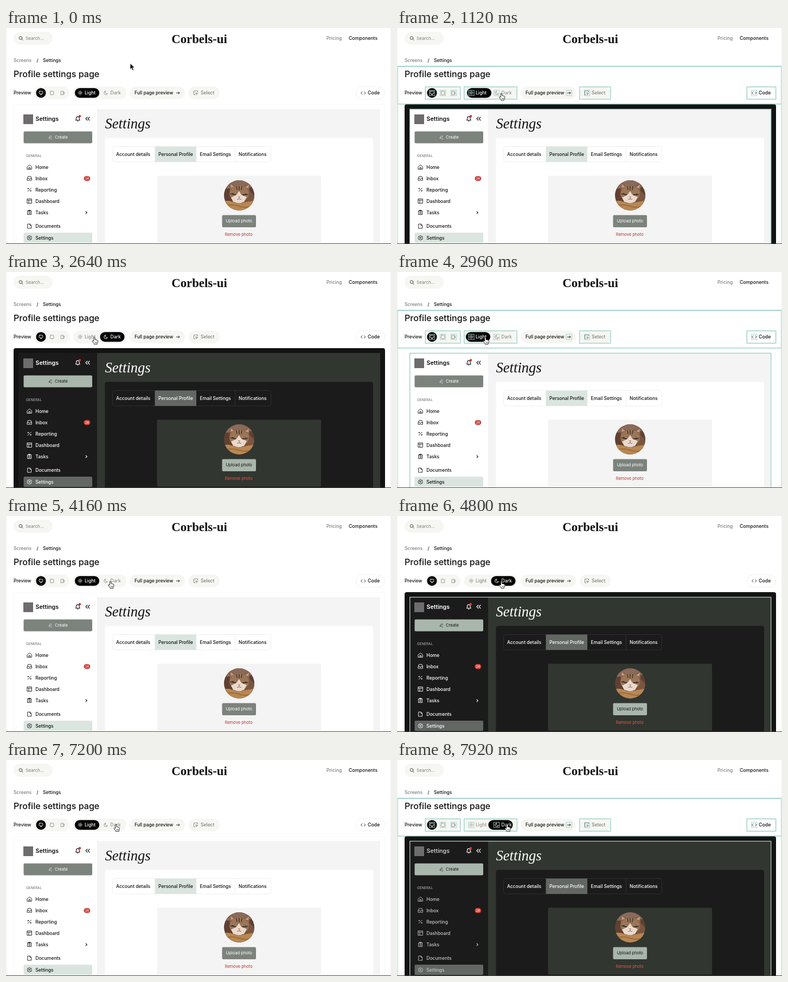
These frames come from a looping animation (710x400 px, 8000 ms). An HTML page:

```html
<!DOCTYPE html>
<html lang="en">
<head>
<meta charset="utf-8">
<title>Settings page theme toggle</title>
<style>
html, body { margin: 0; width: 100%; height: 100%; overflow: hidden; background: #fff; }
svg { display: block; width: 710px; height: 400px; font: 500 8.5px Inter, "Open Sans", sans-serif; }
text { fill: currentColor; white-space: pre; }
.mid { text-anchor: middle; }
.ic { fill: none; stroke: currentColor; stroke-width: .9; stroke-linecap: round; stroke-linejoin: round; }
.track { fill: #f6f6f2; }
.grey { color: #7d7d7b; }
#app {
  --side: #fff; --main: #f4f4f4; --panel: #fff; --line: #efefef; --sel: #dbe5df;
  --btn: #7c827c; --btnText: #fff; --text: #111; --soft: #666; --warn: #b23a2e; --badge: #c8423c;
  color: var(--text);
}
#app.dark {
  --side: #1b1b1b; --main: #313630; --panel: #1b1b1b; --line: #2c2e2c; --sel: #626764;
  --btn: #a9b6ac; --btnText: #161616; --text: #fff; --soft: #bbb; --warn: #f0543f; --badge: #e0473d;
}
</style>
</head>
<body>
<svg id="stage" viewBox="0 0 710 400" xmlns="http://www.w3.org/2000/svg">
  <defs>
    <clipPath id="round"><circle cx="430" cy="310" r="28"/></clipPath>
  </defs>
  <rect width="710" height="400" fill="#fff"/>

  <g id="page" color="#111">
    <rect class="track" x="14" y="7" width="72" height="24" rx="12"/>
    <g class="ic" color="#333"><circle cx="27" cy="18.5" r="2.8"/><path d="M29.2 20.7l2 2"/></g>
    <text class="grey" x="36" y="22" font-size="8.1" font-weight="400">Search...</text>
    <text class="mid" x="356.5" y="27.5" style="font:bold 22.8px 'Liberation Serif',serif">Corbels-ui</text>
    <text class="grey" x="591" y="22">Pricing</text>
    <text x="632" y="22" font-size="8.7">Components</text>
    <text class="grey" x="14" y="63">Screens</text>
    <text x="56.5" y="63">/</text>
    <text x="68" y="63">Settings</text>
    <text x="14" y="91" font-size="16.1" font-weight="450">Profile settings page</text>

    <text x="14" y="123.2">Preview</text>
    <rect class="track" x="51.5" y="108.5" width="65.5" height="23.5" rx="11.7"/>
    <circle cx="64.5" cy="120.2" r="9" fill="#000"/>
    <g class="ic" color="#fff"><rect x="61.2" y="117" width="6.6" height="4.8" rx="1"/><path d="M63 123.5h3"/></g>
    <g class="ic" color="#8d8d88"><rect x="81.6" y="117" width="6.2" height="6.6" rx=".8"/><path d="M101.5 117h4v6.6h-4zM105.5 118.5h2v3.6h-2"/></g>

    <rect class="track" x="123.5" y="108.5" width="98.5" height="23.5" rx="11.7"/>
    <rect id="pill" y="111.2" width="45" height="18" rx="9" fill="#000"/>
    <g id="light"><g class="ic"><circle cx="136.8" cy="120" r="1.7"/><path id="rays"/></g><text x="145" y="123.2">Light</text></g>
    <g id="dark"><path class="ic" d="M183.6 116.8a3.4 3.4 0 1 0 3.7 4.5 3 3 0 0 1-3.7-4.5z"/><text x="192.5" y="123.2">Dark</text></g>

    <rect class="track" x="228" y="108.5" width="102" height="23.5" rx="11.7"/>
    <text x="237" y="123.2">Full page preview</text>
    <path class="ic" d="M314.2 120.3h5.8m-2-2 2 2-2 2"/>
    <rect class="track" x="337" y="108.5" width="57" height="23.5" rx="11.7"/>
    <g class="grey"><path class="ic" stroke-width=".8" d="M348.5 123.7h-2v-7h7v2M350 120.2l1.1 3.6.9-1.5 1.6-.7z"/><text x="359" y="123.2">Select</text></g>
    <rect x="645" y="108.8" width="53.5" height="23" rx="11.5" fill="#fff" stroke="#f0f0ee"/>
    <path class="ic" d="M656.8 118l-2.2 2.3 2.2 2.3M660.6 118l2.2 2.3-2.2 2.3"/>
    <text x="667" y="123.2" font-size="8.8">Code</text>
  </g>

  <rect id="frame" x="14.5" y="141.5" width="684" height="270" rx="3"/>

  <g id="app">
    <rect x="23" y="150" width="667" height="250" fill="var(--main)"/>
    <rect x="23" y="150" width="145" height="250" fill="var(--side)"/>
    <rect x="32" y="160" width="18" height="18" fill="#6f6c6d"/>
    <g class="ic" style="stroke-width:1.1"><path d="M128.5 170.8c1.3-1.2 1-2.6 1.2-4a2.7 2.7 0 0 1 5.4 0c.2 1.4-.1 2.8 1.2 4zM131.4 172.3h2M150 165l-3 3 3 3m4-6-3 3 3 3"/></g>
    <circle cx="136" cy="163.3" r="2.2" fill="#d8352c"/>
    <rect x="32.5" y="191.5" width="126.5" height="22" rx="2" fill="var(--btn)"/>
    <g color="var(--btnText)"><path class="ic" style="stroke-width:.7" d="M79.3 204.2l.5-2 3-3 1.4 1.4-3 3zM82 205.3h2.5"/><text x="90" y="205.3" font-size="7.6" font-weight="400">Create</text></g>
    <text x="37" y="239" font-size="6.3" font-weight="400" color="var(--soft)">GENERAL</text>
    <rect x="32.5" y="379" width="126.5" height="19" rx="2" fill="var(--sel)"/>
    <g id="menu"><text x="54.5" y="172" font-size="10.7" font-weight="600">Settings</text><path class="ic" style="stroke-width:1.2" d="M147.3 339.8l2 2-2 2"/></g>
    <rect x="143.5" y="274.2" width="11.8" height="9" rx="4.5" fill="var(--badge)"/>
    <text class="mid" x="149.4" y="280.8" font-size="5.6" font-weight="400" color="#fff">24</text>

    <text x="182.5" y="186" style="font:italic 26.6px 'Liberation Serif',serif">Settings</text>
    <rect x="182.5" y="203.5" width="494.5" height="210" rx="4" fill="var(--panel)"/>
    <rect x="196.5" y="219.5" width="292" height="28.5" rx="4" fill="none" stroke="var(--line)"/>
    <rect x="274.5" y="219.5" width="76.5" height="28.5" fill="var(--sel)"/>
    <path d="M422.5 220v28" stroke="var(--line)"/>
    <text x="203" y="237">Account details</text>
    <text x="281" y="237">Personal Profile</text>
    <text x="357.5" y="237">Email Settings</text>
    <text x="429" y="237">Notifications</text>
    <rect x="278.5" y="273.5" width="302.5" height="124" rx="2" fill="var(--main)"/>
    <g clip-path="url(#round)">
      <rect x="400" y="280" width="60" height="60" fill="#5f4032"/>
      <path d="M400 280h60v14l-60 4z" fill="#8a6a5a"/>
      <path d="M441 298q14 4 19 20v12h-22z" fill="#7a5540"/>
      <path d="M413 306l-1-21 12 8h12l14-7-2 22z" fill="#86634c"/>
      <path d="M414.500 296v-7l6 5zM447 297l1-7-7 5z" fill="#c79a86"/>
      <ellipse cx="430" cy="307" rx="18" ry="15" fill="#9a7658"/>
      <path d="M425 293l1 7M430 292.500v8M435 293l-1 7M413.500 307l5 1M446.500 308l-5 1" stroke="#4b3327" stroke-width="1.600"/>
      <path d="M430 302l4 7 10 4-5 9-9 3-11-3-4-8 10-5z" fill="#e9dacd"/>
      <path d="M417 306q3 3.500 7 2.500M436 308.500q4 1.500 7-1.500" fill="none" stroke="#2f2019" stroke-width="1.500"/>
      <path d="M427.500 312h5l-2.500 2.600z" fill="#bf7f76"/>
      <path d="M430 314.500v1.500q-2 2.500-4 1M430 316q2 2.500 4 1" fill="none" stroke="#6d4a3c" stroke-width=".8"/>
      <path d="M400 321q10-3 18 1t22 1 20-3v20h-60z" fill="#b98752"/>
      <path d="M400 330q16-5 30 0t30-2" fill="none" stroke="#9b6c3d" stroke-width="2"/>
    </g>
    <rect x="398.5" y="346.5" width="62.5" height="22.5" rx="2" fill="var(--btn)"/>
    <text class="mid" x="429.7" y="360.4" font-size="7.6" font-weight="400" color="var(--btnText)">Upload photo</text>
    <text class="mid" x="429.2" y="384.6" font-size="7.5" font-weight="400" color="var(--warn)">Remove photo</text>
  </g>

  <g id="marks" fill="none" stroke="#9dd0c7"></g>
  <rect id="appMark" x="23.7" y="150.4" width="666" height="270" fill="none" stroke-width="1.4"/>
  <path d="M.5 0v400M709.5 0v400" stroke="#f2f2f2"/>
  <path d="M0 399.5h710" stroke="#444"/>

  <g id="cursor" stroke-linejoin="round">
    <path id="arrow" d="M0 0v11.2l2.6-2.4 2 4.6 2-.9-2-4.4h3.6z" fill="#000" stroke="#fff" stroke-width=".8"/>
    <g id="hand" stroke="#111" stroke-width=".9">
      <path d="M-1.2 6.6V1a1.2 1.2 0 0 1 2.4 0v3.2l4 .9q1.3.5 1.2 2l-.5 2.6q-.2 1-.8 1.7v1.4H-.6v-1.3L-3.7 7.8q-.6-1.1.3-1.6 1-.3 2.2 1.1z" fill="#fff"/>
      <path d="M1.2 8.4v2.4M2.7 8.4v2.4M4.1 8.4v2.4" stroke-width=".6"/>
    </g>
  </g>
</svg>
<script>
const LOOP = 8000;
const el = id => document.getElementById(id);
const clamp = x => Math.max(0, Math.min(1, x));
const mix = (a, b, p) => a + (b - a) * p;
const grey = v => `rgb(${v},${v},${v})`;
const easeCubic = x => x < .5 ? 4 * x ** 3 : 1 - 4 * (1 - x) ** 3;
const easeSine = x => (1 - Math.cos(Math.PI * x)) / 2;
const show = (node, on) => node.setAttribute('visibility', on ? 'visible' : 'hidden');

// Each click flips the theme, starting from light.
const clicks = [1050, 2700, 4390, 5996, 7740];
const PILL_DELAY = 20, PILL_TIME = 230, APP_DELAY = 80, FADE = 150;
const MARK_TIME = 350, APP_MARK_TIME = 720;

// time, x, y of the pointer tip
const pointer = [
  [0, 229, 65.5], [880, 192.5, 121],
  [1840, 192.5, 121], [2400, 163, 121],
  [3280, 163, 121], [3680, 192.5, 121],
  [5440, 192.5, 121], [5680, 161, 121.5],
  [6720, 161, 121.5], [7040, 204, 120.5],
  [7120, 204, 120.5], [7200, 203, 119.5]
];

const menu = [
  ['Home', 257.5, 'M-4-.6 0-4 4-.6V4h-8zM-1.2 4V.8h2.4V4'],
  ['Inbox', 278.5, 'M-4 0l1.5-3.6h5L4 0v3.6h-8zM-4 0h2.4l.8 1.4H.8L1.6 0H4'],
  ['Reporting', 299.5, 'M-3 3l6-6M-3.2-2h1.8M-2.3-2.9v1.8M1.4 2h1.8M2.3 1.1v1.8'],
  ['Dashboard', 320.5, 'M-4-4h8v8h-8zM-4-1.5h8M-1.3-1.5V4'],
  ['Tasks', 341.5, 'M-3.3-3h6.6V4h-6.6zM-1.3-4.2h2.6v2h-2.6zM-1.5 0h3M-1.5 2h3'],
  ['Documents', 367, 'M-3.2-4h4l2.4 2.4V4h-6.4zM.8-4v2.4h2.4'],
  ['Settings', 388.5, 'M0-4l1.5 1 1.8.2.2 1.8L4.2 0l-.7 1.2-.2 1.8-1.8.2L0 4.2l-1.5-1-1.8-.2-.2-1.8L-4.2 0l.7-1 .2-1.8 1.8-.2zM-1.3 0a1.3 1.3 0 1 0 2.6 0 1.3 1.3 0 1 0-2.6 0']
];
el('menu').innerHTML += menu.map(([name, y, d]) =>
  `<path class="ic" transform="translate(43.3 ${y})" d="${d}"/><text x="54.3" y="${y + 3.1}">${name}</text>`).join('');

el('rays').setAttribute('d', Array.from({ length: 8 }, (_, i) => {
  const a = i * Math.PI / 4, at = r => `${136.8 + r * Math.cos(a)} ${120 + r * Math.sin(a)}`;
  return `M${at(3.1)}L${at(4)}`;
}).join(''));

const iconBoxes = [59.5, 79.5, 99.5, 132, 178.5, 312, 345.5, 653.5].map(x => [x, 115.2, 10.2, 10]);
const boxes = [
  [1, 71, 708, 69.8], [1, 71, 708, 360],
  [52.3, 109, 64.4, 22.8], [123.8, 109, 97.4, 22.8], [336.8, 109, 57, 22.8], [645.3, 109, 53.4, 22.8]
];
const rect = w => ([x, y, width, height]) =>
  `<rect x="${x}" y="${y}" width="${width}" height="${height}" stroke-width="${w}"/>`;
el('marks').innerHTML = boxes.map(rect(1.4)).join('') + iconBoxes.map(rect(.9)).join('');

function pointerAt(t) {
  let i = 0;
  while (i < pointer.length - 2 && t >= pointer[i + 1][0]) i++;
  const a = pointer[i], b = pointer[i + 1];
  const p = easeSine(clamp((t - a[0]) / (b[0] - a[0])));
  return [mix(a[1], b[1], p), mix(a[2], b[2], p)];
}

function draw(t) {
  const count = clicks.filter(c => t >= c).length;
  const since = count ? t - clicks[count - 1] : Infinity;
  const dark = count % 2 === 1;
  const appDark = since >= APP_DELAY ? dark : !dark;

  const slide = easeCubic(clamp((since - PILL_DELAY) / PILL_TIME));
  const side = dark ? slide : 1 - slide;
  el('pill').setAttribute('x', mix(127, 173.5, side));
  el('light').setAttribute('color', grey(Math.round(mix(255, 140, side))));
  el('dark').setAttribute('color', grey(Math.round(mix(140, 255, side))));

  const frame = el('frame');
  frame.setAttribute('fill', dark ? '#121312' : '#fff');
  frame.setAttribute('stroke', dark ? '#121312' : '#f7f7f7');
  el('app').setAttribute('class', appDark ? 'dark' : '');

  // Menu colours trail behind the theme switch.
  const fade = since < APP_DELAY ? 1 : easeSine(clamp((since - APP_DELAY) / FADE));
  el('menu').setAttribute('color', grey(Math.round(appDark ? mix(17, 255, fade) : mix(255, 17, fade))));

  show(el('marks'), since < MARK_TIME);
  show(el('appMark'), since < APP_MARK_TIME);
  el('appMark').setAttribute('stroke', appDark ? '#a9c1b6' : '#9dd0c7');

  const [x, y] = pointerAt(t);
  el('cursor').setAttribute('transform', `translate(${x} ${y})`);
  show(el('arrow'), y < 109);
  show(el('hand'), y >= 109);
}

const start = performance.now();
function tick() {
  draw((performance.now() - start) % LOOP);
  requestAnimationFrame(tick);
}
tick();
</script>
</body>
</html>
```
